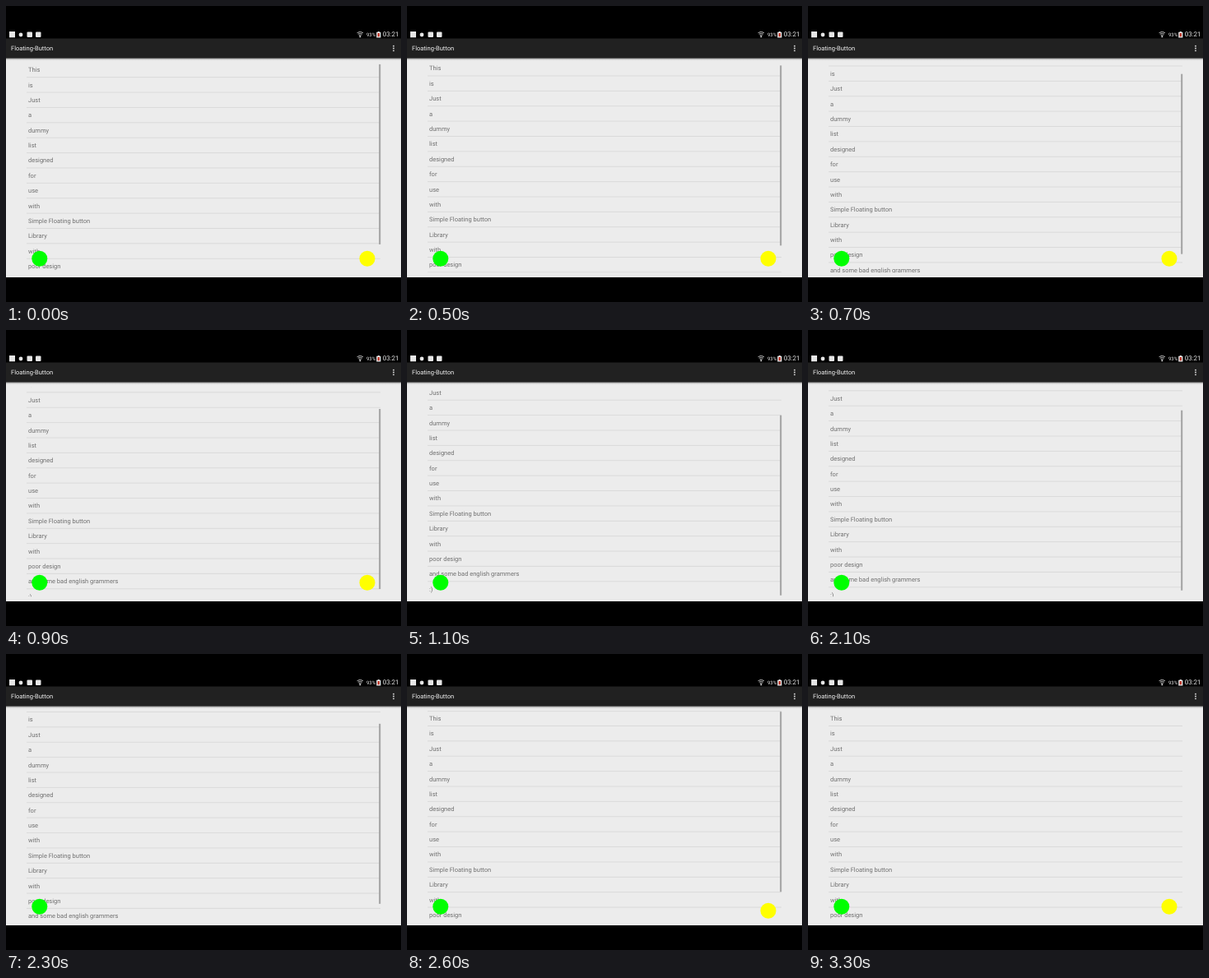
Animation of 480 by 360 pixels, one loop 4000 ms. Source, as an HTML page:

```html
<!DOCTYPE html>
<html lang="en">
<head>
<meta charset="utf-8">
<title>Floating-Button</title>
<style>
html, body { margin: 0; width: 100%; height: 100%; overflow: hidden; background: #000; }
svg { display: block; width: 480px; height: 360px; }
text { font: 7.5px Roboto, sans-serif; text-rendering: geometricPrecision; }
#rows text { fill: #707070; }
#rows line, #edge { stroke: #d6d6d6; stroke-width: .8; }
</style>
</head>
<body>
<svg viewBox="0 0 480 360">
  <defs>
    <clipPath id="list"><rect x="20" y="69" width="440" height="255.3"/></clipPath>
    <clipPath id="page"><rect y="63" width="480" height="267"/></clipPath>
    <linearGradient id="shade" x2="0" y2="1">
      <stop stop-color="#8a8a8a"/><stop offset="1" stop-color="#ececec"/>
    </linearGradient>
  </defs>
  <rect width="480" height="360"/>
  <rect y="63" width="480" height="267" fill="#ececec"/>
  <rect y="63" width="480" height="3" fill="url(#shade)"/>
  <rect y="39.5" width="480" height="24" fill="#212121"/>

  <!-- status bar -->
  <g fill="#e6e6e6">
    <rect x="4" y="31" width="7" height="7.3"/>
    <circle cx="18" cy="35" r="2.4"/>
    <rect x="25.5" y="31.5" width="6.5" height="6.5" rx="1"/>
    <rect x="36" y="31.5" width="6.5" height="6.5" rx="1"/>
    <text x="438" y="37" style="font-size:6px">93%</text>
    <text x="477.6" y="37.3" text-anchor="end" style="font-size:8px">03:21</text>
    <path d="M451.8 31h2v.8h1.6v6.8h-5.2v-6.8h1.6z"/>
    <rect x="451.6" y="33" width="2.4" height="4.2" fill="#c0392b"/>
    <circle cx="430.3" cy="37.2" r="1"/>
  </g>
  <path d="M426.6 32.6q3.7-2.6 7.4 0M427.7 34.2q2.6-1.8 5.2 0M428.8 35.7q1.5-1 3 0" fill="none" stroke="#ccc" stroke-width=".9"/>

  <!-- action bar -->
  <text x="6" y="54" fill="#f2f2f2">Floating-Button</text>
  <g fill="#e0e0e0">
    <circle cx="471" cy="48.7" r=".9"/><circle cx="471" cy="51.5" r=".9"/><circle cx="471" cy="54.3" r=".9"/>
  </g>

  <g clip-path="url(#list)"><g id="rows"></g></g>
  <path id="edge" d="M25 69.6H455"/>
  <rect id="bar" x="453.2" width="2" height="219" fill="#a2a2a2"/>
  <g clip-path="url(#page)">
    <circle cx="40.8" cy="307.2" r="9.5" fill="#0f0"/>
    <circle id="yellow" cx="439" r="9.5" fill="#ff0"/>
  </g>
</svg>
<script>
const LOOP = 4000, PITCH = 18.38, HIDDEN = 342;
const words = ["This", "is", "Just", "a", "dummy", "list", "designed", "for", "use", "with",
  "Simple Floating button", "Library", "with", "poor design", "and some bad english grammers", ":)"];

// Each table row: start time in ms, value held from then on
const scroll = [[0, .8], [500, 2.5], [600, 7.5], [700, 14.5], [800, 22.5], [900, 30], [1000, 36.5], [1100, 39],
  [2000, 37], [2100, 32], [2200, 25], [2300, 17], [2400, 9], [2500, 3], [2600, 0]];
const fade = [[0, 1], [1400, .8], [1500, .45], [1600, .12], [1700, 0], [2000, 1],
  [3000, .8], [3100, .45], [3200, .12], [3300, 0]];
const drop = [[0, 307.2], [1000, 315], [1100, HIDDEN], [2600, 312.3], [2700, 307.2]];
const glow = [[0, 0], [2600, 1], [2800, 0]];

const get = id => document.getElementById(id);
const rows = get("rows"), bar = get("bar"), yellow = get("yellow"), edge = get("edge");

function add(tag, attrs, label = "") {
  const el = document.createElementNS("http://www.w3.org/2000/svg", tag);
  for (const key in attrs) el.setAttribute(key, attrs[key]);
  el.textContent = label;
  rows.append(el);
}

words.forEach((word, i) => {
  const y = 69.1 + PITCH * (i + 1);
  add("text", { x: 27, y: y - 6.5 }, word);
  if (i < words.length - 1) add("line", { x1: 25, x2: 455, y1: y, y2: y });
});

function held(steps, t) {
  let value;
  for (const [start, v] of steps) if (t >= start) value = v;
  return value;
}

function draw() {
  const t = performance.now() % LOOP;
  const s = held(scroll, t);
  rows.setAttribute("transform", `translate(0 ${-s})`);
  bar.setAttribute("y", 70.2 + s * .86);
  bar.setAttribute("opacity", held(fade, t));
  yellow.setAttribute("cy", held(drop, t));
  edge.setAttribute("opacity", held(glow, t));
  requestAnimationFrame(draw);
}
draw();
</script>
</body>
</html>
```
